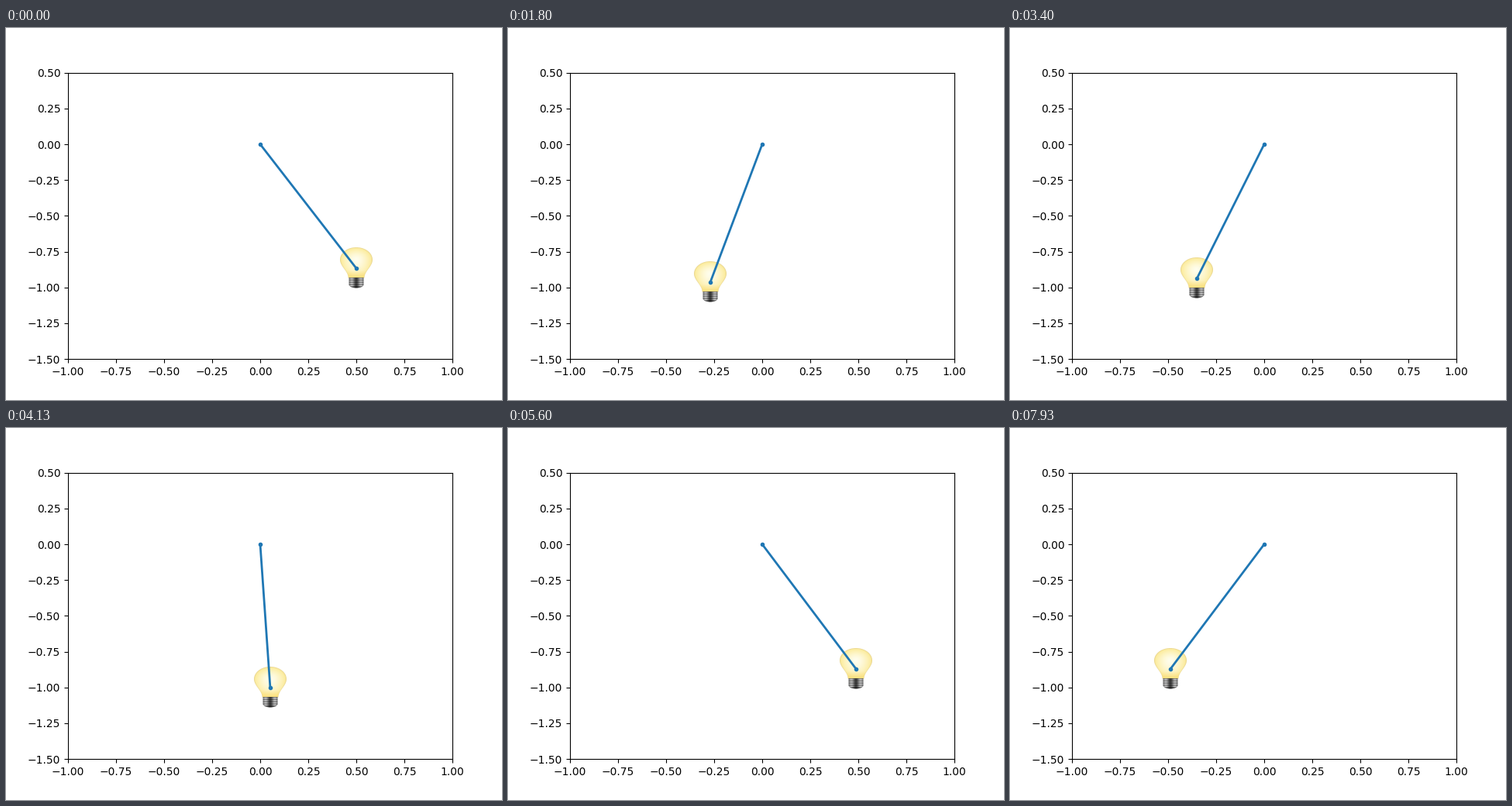
Animation of 640x480 px, one loop 8000 ms. Source, as a matplotlib script:

```python
import numpy as np
import matplotlib.pyplot as plt
from matplotlib.animation import FuncAnimation
from matplotlib.offsetbox import AnnotationBbox, OffsetImage

LOOP_MS = 8000
TICK_MS = 20
STEPS = 120  # pendulum steps in one loop
GRAVITY = 9.81
DT = 0.025
W, H, SS = 44, 54, 6  # bulb size in pixels, supersampling


def swing(n):
    """Angles of a unit pendulum released at 30 degrees."""
    angle, speed, out = np.pi / 6, 0.0, []
    for _ in range(n):
        out.append(angle)
        speed -= GRAVITY * np.sin(angle) * DT
        angle += speed * DT
    return out


def mix(a, b, t):
    t = np.clip(t, 0, 1)[..., None]
    return np.array(a) * (1 - t) + np.array(b) * t


def make_bulb():
    xs = (np.arange(W * SS) + 0.5) / SS - W / 2
    ys = (np.arange(H * SS) + 0.5) / SS - H / 2
    x, y = np.meshgrid(xs, ys)
    img = np.full(x.shape + (3,), 255.0)

    # glass: half ellipse on top, cosine taper down to the neck
    dome = 21 * np.sqrt(np.clip(1 - ((y + 11) / 16) ** 2, 0, 1))
    taper = 10.4 + 5.3 * (1 + np.cos(np.pi * (y + 11) / 23.5))
    half = np.where(y < -11, dome, taper)
    glass = (np.abs(x) < half) & (y < 12.5)
    dist = np.hypot(x / 21, (y + 11) / np.where(y < -11, 16, 25))
    color = mix((255, 254, 238), (252, 234, 148), dist ** 1.5)
    color = mix(color, (250, 217, 105), 0.6 * (y - 3) / 9)
    edge = np.maximum(dist * (y < -11), np.abs(x) / np.maximum(half, 1))
    color = mix(color, (224, 204, 140), 0.8 * (edge - 0.92) / 0.08)
    img[glass] = color[glass]

    # threaded metal base with a rounded foot
    base_half = 9.5 * np.sqrt(np.clip(1 - ((y - 21) / 4.5) ** 2, 0, 1))
    base_half = np.where(y < 21, 9.5, base_half)
    base = (np.abs(x) < base_half) & (y >= 12)
    shine = 130 - 65 * np.cos(np.pi * x / 6)
    groove = 0.85 + 0.25 * np.cos(2 * np.pi * (y - 13.8) / 2.9)
    tone = shine * groove * np.where(y > 23.2, 0.7, 1)
    img[base] = tone[base][:, None]

    img = img.reshape(H, SS, W, SS, 3).mean(axis=(1, 3))
    return np.clip(img, 0, 255).astype(np.uint8)


angles = swing(STEPS)

fig, ax = plt.subplots(figsize=(6.4, 4.8), dpi=100)
ax.set(xlim=(-1, 1), ylim=(-1.5, 0.5),
       xticks=np.linspace(-1, 1, 9), yticks=np.linspace(-1.5, 0.5, 9))
rod, = ax.plot([], [], ".-", lw=2, color="C0")
picture = OffsetImage(make_bulb(), zoom=1, dpi_cor=False,
                      interpolation="bilinear")
bulb = AnnotationBbox(picture, (0, -1), frameon=False, pad=0)
bulb.set_zorder(1)
ax.add_artist(bulb)


def update(i):
    # the pose holds for about 67 ms, chosen at the middle of each tick
    middle = i * TICK_MS + TICK_MS // 2
    step = min((middle * STEPS + LOOP_MS // 2 * STEPS // 100) // LOOP_MS,
               STEPS - 1) if i else 0
    x, y = np.sin(angles[step]), -np.cos(angles[step])
    rod.set_data([0, x], [0, y])
    bulb.xy = bulb.xybox = (x, y)
    return bulb, rod


update(0)
anim = FuncAnimation(fig, update, frames=LOOP_MS // TICK_MS, interval=TICK_MS,
                     repeat=True, repeat_delay=0, blit=False)
plt.show()
```
